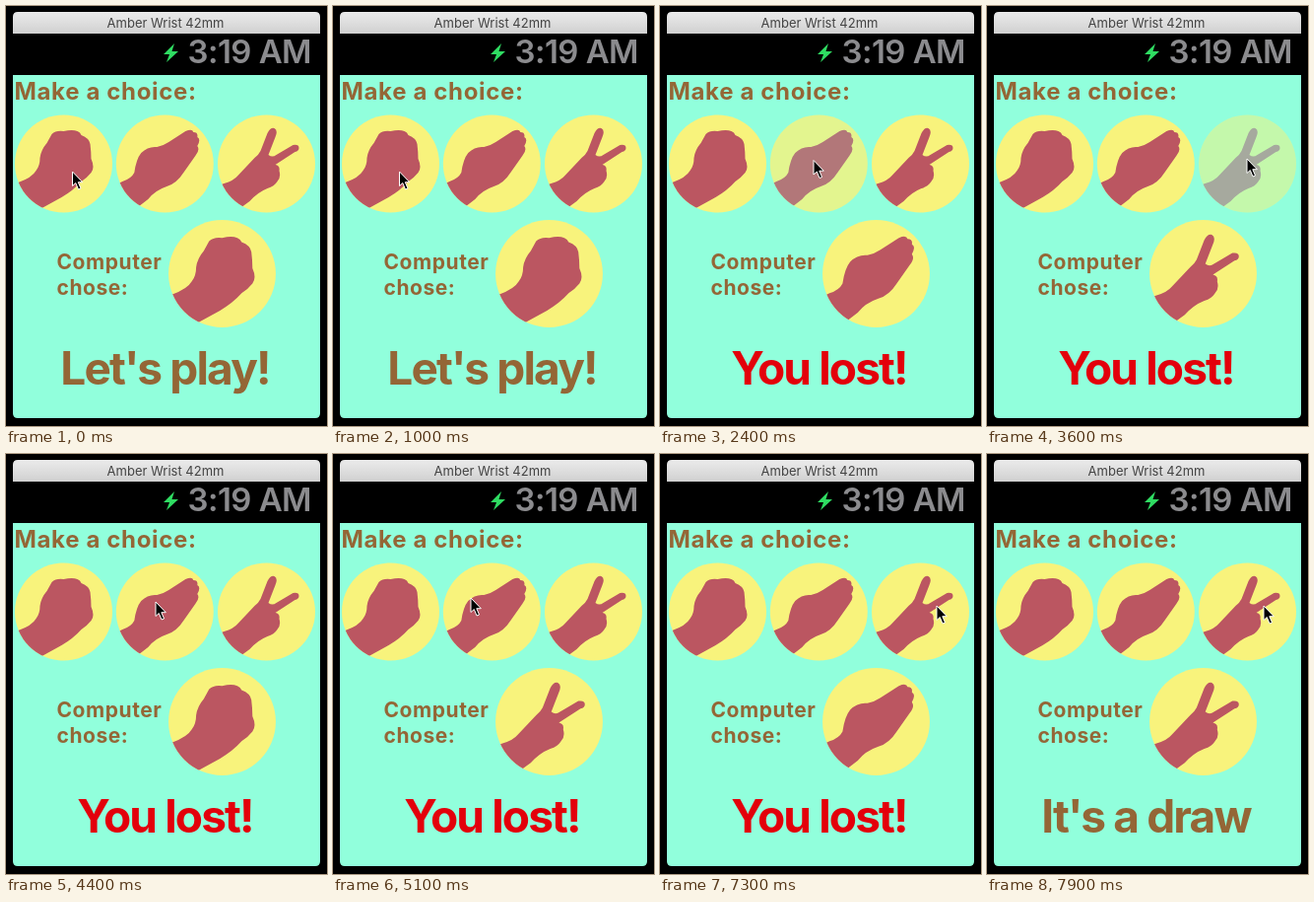
Animation, 326 px wide and 426 px high, one loop 8 s. Source, as an HTML page:

```html
<!DOCTYPE html>
<html lang="en">
<head>
<meta charset="utf-8">
<title>Hand game</title>
<style>
  html, body { margin: 0; width: 100%; height: 100%; overflow: hidden; background: #000; }
  svg { display: block; width: 100%; height: 100%; }
  text { font-family: Inter, "Open Sans", sans-serif; font-weight: 700; fill: #946636; white-space: pre; }
  .title { font-size: 13px; font-weight: 400; fill: #444; text-anchor: middle; }
  .clock { font-size: 33px; font-weight: 600; fill: #8b8b8e; text-anchor: end; letter-spacing: -.55px; }
  .prompt { font-size: 24px; letter-spacing: .65px; }
  .label { font-size: 21px; letter-spacing: .55px; }
  .result { font-size: 46px; text-anchor: middle; letter-spacing: -1.85px; }
</style>
</head>
<body>
<svg viewBox="0 0 326 426">
  <defs>
    <linearGradient id="bar" x2="0" y2="1">
      <stop offset="0" stop-color="#ebebeb"/>
      <stop offset="1" stop-color="#d0d0d0"/>
    </linearGradient>
    <clipPath id="disc"><circle r="49.5"/></clipPath>
    <path id="rock" d="M-60,24 L-46,19 Q-32,14 -28,7 Q-24,2 -24,-6 Q-23,-14 -17,-21 L-12,-30 Q-8,-34 0,-33 Q9,-35 14,-33 Q17,-32 18,-29 Q26,-26 27,-20 Q28,-12 28,-5 Q32,4 28,9 Q24,14 18,18 Q10,27 -2,34 L-22,45 L-30,60 Z"/>
    <path id="paper" d="M-60,26 L-43,18 Q-34,15 -31,9 Q-29,-5 -24,-11 Q-17,-18 -8,-17 Q-2,-18 4,-22 L21,-33 Q28,-36 29,-32 Q34,-32 33,-27 Q37,-25 33,-18 Q36,-14 31,-8 L19,9 Q12,20 2,23 Q-10,27 -17,36 L-30,46 L-45,60 Z"/>
    <path id="scissors" d="M-60,26 L-43,20 Q-33,17 -29,12 L-12,-6 Q-8,-9 -6,-13 L1,-31 Q4,-37 8,-36 Q12,-34 9,-27 L2,-9 Q6,-6 10,-9 L27,-19 Q33,-20 33,-16 Q33,-13 29,-12 L9,1 Q14,2 13,7 Q15,14 11,18 Q8,23 1,25 Q-9,29 -17,38 L-28,46 L-40,60 Z"/>
  </defs>
  <rect width="326" height="426"/>
  <path d="M7,28 V11 Q7,6 12,6 H314 Q319,6 319,11 V28 Z" fill="url(#bar)"/>
  <text class="title" x="162" y="22">Amber Wrist 42mm</text>
  <path d="M171,38 L160,49 H166 L163,57 L175,46 H168.5 Z" fill="#2fdc62"/>
  <text class="clock" x="310" y="57.500">3:19 AM</text>
  <path d="M7,70 H319 V413 Q319,418 314,418 H12 Q7,418 7,413 Z" fill="#91ffdc"/>
  <text class="prompt" x="8.500" y="95">Make a choice:</text>
  <text class="label" x="51.500" y="266.500">Computer</text>
  <text class="label" x="51.500" y="292.500">chose:</text>
  <g id="hands"></g>
  <text class="result" id="result" x="161.500" y="384"></text>
  <path id="cursor" d="M0,0 V14.500 L3.300,11.500 L6,18 L8.500,17 L5.800,10.700 H10.300 Z" fill="#000" stroke="#fff"/>
</svg>
<script>
const LOOP = 8000, STEP = 100;
const hands = document.getElementById("hands");
const result = document.getElementById("result");
const cursor = document.getElementById("cursor");

// Each tap: start time, button, computer's answer, verdict
const taps = [
  [1600, "rock", "paper", "You lost!"],
  [2340, "paper", "scissors", "You lost!"],
  [3450, "scissors", "rock", "You lost!"],
  [4450, "paper", "scissors", "You lost!"],
  [5840, "rock", "paper", "You lost!"],
  [7380, "scissors", "scissors", "It's a draw"]
];
const ANSWER_DELAY = 350;

// Pointer stops: time, x, y
const stops = [
  [0, 67.5, 168], [1980, 67.5, 168],
  [2300, 156, 156.5], [2780, 156, 156.5],
  [3300, 264, 155], [3950, 264, 155],
  [4400, 152, 150], [4850, 152, 150],
  [5000, 140, 146], [5250, 140, 146],
  [5700, 66, 164], [6280, 66, 164],
  [6950, 281, 154], [LOOP, 281, 154]
];

function addHand(kind, x, y, scale = 1) {
  const g = document.createElementNS("http://www.w3.org/2000/svg", "g");
  g.setAttribute("transform", `translate(${x} ${y}) scale(${scale})`);
  g.innerHTML = `<circle r="49.5" fill="#f8f37c"/>
    <g clip-path="url(#disc)"><use href="#${kind}" fill="#bb5661"/></g>`;
  hands.append(g);
  return g;
}

const buttons = {
  rock: addHand("rock", 58.5, 160),
  paper: addHand("paper", 161.3, 160),
  scissors: addHand("scissors", 264.5, 160)
};
const answer = addHand("rock", 219.5, 271.5, 1.1).querySelector("use");

const clamp = v => Math.max(0, Math.min(1, v));
const ease = v => v * v * (3 - 2 * v);

// Dims to half on touch, then recovers
function pressAmount(age) {
  return 0.5 * Math.min(clamp(age / 150), clamp((450 - age) / 200));
}

function pointerAt(t) {
  const i = stops.findIndex(s => s[0] > t);
  const [t0, x0, y0] = stops[i - 1], [t1, x1, y1] = stops[i];
  const k = ease((t - t0) / (t1 - t0));
  return [x0 + (x1 - x0) * k, y0 + (y1 - y0) * k];
}

function draw(t) {
  for (const kind in buttons) {
    const dim = taps.filter(tap => tap[1] === kind)
      .reduce((sum, tap) => sum + pressAmount(t - tap[0]), 0);
    buttons[kind].setAttribute("opacity", 1 - dim);
  }
  const last = taps.filter(tap => t >= tap[0] + ANSWER_DELAY).pop();
  const [, , kind, verdict] = last || [0, "", "rock", "Let's play!"];
  answer.setAttribute("href", "#" + kind);
  result.textContent = verdict;
  result.style.fill = verdict === "You lost!" ? "#e3000b" : "";
  cursor.setAttribute("transform", `translate(${pointerAt(t)})`);
}

const start = performance.now();
function tick() {
  const t = (performance.now() - start) % LOOP;
  draw(Math.floor(t / STEP) * STEP);
  requestAnimationFrame(tick);
}
tick();
</script>
</body>
</html>
```
